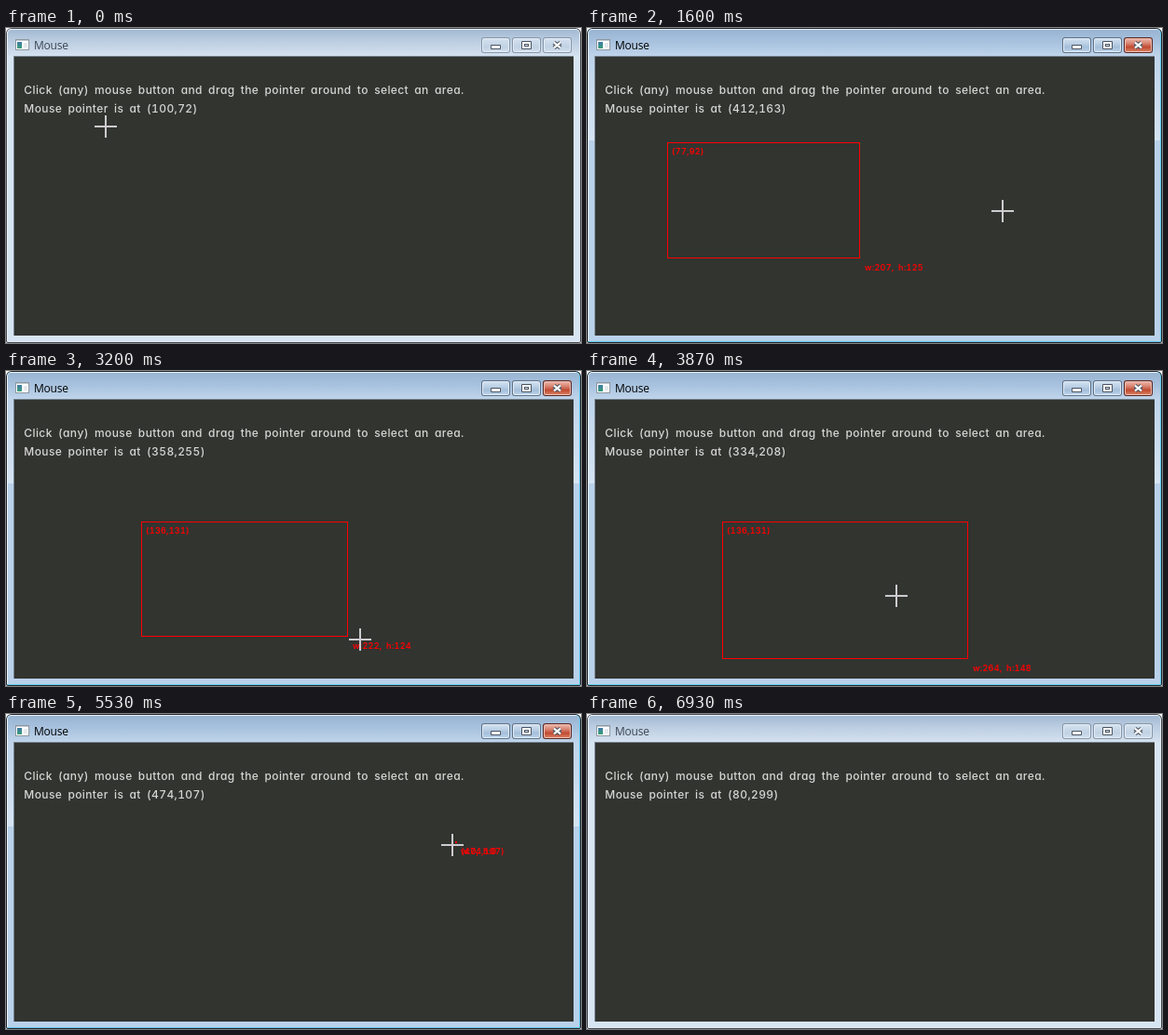
Recreate the animation shown at these times as an HTML page with a canvas. Size 617 by 339 pixels, loop 6.99 s.

```html
<!DOCTYPE html>
<html lang="en">
<head>
<meta charset="utf-8">
<title>Mouse</title>
<style>
  html, body { margin: 0; width: 100%; height: 100%; overflow: hidden; background: #fff; }
  canvas, svg { position: absolute; left: 0; top: 0; display: block; }
  text { white-space: pre; }
  .title { font: 12px "Open Sans", "Noto Sans", sans-serif; letter-spacing: -0.25px; }
  .info, .label {
    font-family: Inter, "Liberation Sans", sans-serif;
    font-feature-settings: "cv11" 1, "tnum" 1, "calt" 0;
    font-kerning: none;
  }
  .info { font-size: 12px; font-weight: 500; letter-spacing: 0.39px; word-spacing: 2.6px; fill: #d6d6d3; }
  .label { font-size: 9px; font-weight: 600; letter-spacing: 0.27px; word-spacing: 1.95px; fill: #f00; }
</style>
</head>
<body>
<canvas id="stage" width="617" height="339"></canvas>
<svg width="617" height="339">
  <text id="title" class="title" x="30" y="23">Mouse</text>
  <text class="info" x="19.3" y="71">Click (any) mouse button and drag the pointer around to select an area.</text>
  <text id="info" class="info" x="19.3" y="91"></text>
  <text id="from" class="label"></text>
  <text id="size" class="label"></text>
  <path id="cross" d="M-12 0H12M0 -12V12" stroke="#cdcbcf" stroke-width="2"/>
</svg>
<script>
const W = 617, H = 339, LOOP = 6990;
const CLIENT = { x: 9, y: 31 };
const CLEARED = 6400, POINTER_OUT = 6670, INACTIVE = 6930;
const REST = 200, SETTLE = 70; // pauses after a release and before a press

const point = (x, y) => ({ x, y });
const drag = (press, time, from, to) => ({ press, release: press + time, from, to });

const START = point(100, 72), END = point(80, 299);
const DRAGS = [
  drag(460, 730, point(77, 92), point(284, 217)),
  drag(1870, 410, point(531, 112), point(310, 249)),
  drag(2800, 535, point(136, 131), point(400, 279)),
  drag(4270, 695, point(269, 138), point(423, 247)),
  drag(5530, 670, point(474, 107), point(60, 283))
];

const el = id => document.getElementById(id);
const ctx = el('stage').getContext('2d');

function glide(a, b, t, t0, t1) {
  const u = Math.min(1, Math.max(0, (t - t0) / (t1 - t0))), s = u * u * (3 - 2 * u);
  return point(Math.round(a.x + (b.x - a.x) * s), Math.round(a.y + (b.y - a.y) * s));
}

// Each drag eases from press to release, then the pointer hovers to the next press
function pointerAt(t) {
  const i = DRAGS.findLastIndex(d => t >= d.press);
  const now = DRAGS[i], next = DRAGS[i + 1];
  if (now && t < now.release) return glide(now.from, now.to, t, now.press, now.release);
  return glide(now ? now.to : START, next ? next.from : END, t,
    now ? now.release + REST : SETTLE, next ? next.press - SETTLE : POINTER_OUT);
}

function gradient(y0, y1, ...colors) {
  const g = ctx.createLinearGradient(0, y0, 0, y1);
  colors.forEach((c, i) => g.addColorStop(i / (colors.length - 1), c));
  return g;
}

function box(x, y, w, h, r, fill) {
  ctx.beginPath();
  ctx.roundRect(x, y, w, h, r);
  ctx.fillStyle = fill;
  ctx.fill();
}

function rect(x, y, w, h, fill) {
  ctx.fillStyle = fill;
  ctx.fillRect(x, y, w, h);
}

function drawIcon() {
  rect(10, 12, 15, 12, '#8d979f');
  rect(11, 13, 13, 10, '#fff');
  rect(11, 13, 13, 1, '#c3ccd6');
  box(12, 15, 5, 7, 0, gradient(15, 22, '#3f78a8', '#3aa078'));
  rect(19, 16, 4, 5, '#e4e9ee');
}

function drawX(x, y, color, width) {
  ctx.beginPath();
  for (const s of [-1, 1]) {
    ctx.moveTo(x - 3.5, y - 2.8 * s);
    ctx.lineTo(x + 3.5, y + 2.8 * s);
  }
  ctx.strokeStyle = color;
  ctx.lineWidth = width;
  ctx.stroke();
}

function drawButtons(active) {
  const edge = active ? '#5d7186' : '#8796a8', ink = '#4b5562';
  const plain = active ? ['#cfdfef', '#bdd1e6', '#a5bfda', '#b9d0e8']
                       : ['#d3e0ee', '#c9d8e8', '#c1d2e4', '#d0deec'];
  const red = ['#e9b0a3', '#d98572', '#c14a32', '#d57c5e'];
  for (let i = 0; i < 3; i++) {
    const x = 510 + 33 * i, closing = active && i === 2;
    box(x, 10, 31, 17, 3, closing ? '#5a2520' : edge);
    box(x + 1, 11, 29, 15, 2, closing ? '#eebfb4' : '#e3edf7');
    box(x + 2, 12, 27, 13, 1, gradient(12, 25, ...(closing ? red : plain)));
  }
  box(520, 18, 11, 5, 1, ink);
  rect(521, 19, 9, 3, '#fff');
  box(553, 14, 11, 9, 1, ink);
  rect(554, 15, 9, 7, '#fff');
  rect(556, 17, 5, 3, ink);
  rect(557, 18, 3, 1, '#dce6f0');
  drawX(591.5, 18.5, ink, 4.4);
  drawX(591.5, 18.5, '#fff', 2.2);
}

function drawWindow(active) {
  rect(0, 0, W, H, '#fff');
  box(0, 0, W, H, [6, 6, 2, 2], active ? '#22282e' : '#464c53');
  box(1, 1, W - 2, H - 2, [5, 5, 1, 1], active ? '#63cdf0' : '#e6eef6');
  box(1, 1, W - 3, H - 3, [5, 5, 0, 0], '#eef5fc');
  box(2, 2, W - 4, H - 4, [4, 4, 0, 0], active ? '#b9d1ea' : '#d7e4f2');
  if (active) {
    rect(W - 2, 30, 1, H - 32, '#63cdf0');
    rect(2, H - 2, W - 4, 1, '#63cdf0');
    rect(2, 30, W - 4, 91, gradient(30, 121, '#bfd4ea', '#d6e4f3'));
  }
  box(2, 2, W - 4, 28, [4, 4, 0, 0],
    active ? gradient(2, 30, '#98b4d2', '#a9c3df', '#bfd4ea')
           : gradient(2, 30, '#a3bad3', '#bfd0e3', '#d4e1ef'));
  rect(8, 30, 601, 301, '#73808c');
  rect(CLIENT.x, CLIENT.y, 600, 300, '#323430');
  drawIcon();
  drawButtons(active);
}

function place(node, x, y, text) {
  node.setAttribute('x', x);
  node.setAttribute('y', y);
  node.textContent = text;
}

function drawSelection(t) {
  const now = t < CLEARED && DRAGS.findLast(d => t >= d.press);
  el('from').style.visibility = el('size').style.visibility = now ? 'visible' : 'hidden';
  if (!now) return;
  const a = now.from, b = pointerAt(Math.min(t, now.release));
  const w = b.x - a.x, h = b.y - a.y;
  const x = a.x + CLIENT.x, y = a.y + CLIENT.y;
  ctx.strokeStyle = '#f00';
  ctx.lineWidth = 1;
  ctx.strokeRect(x + 0.5, y + 0.5, w - 1, h - 1);
  place(el('from'), x + 5, y + 13, `(${a.x},${a.y})`);
  place(el('size'), x + w + 5, y + h + 13, `w:${w}, h:${h}`.replace('-', '\u2212'));
}

function draw(t) {
  const active = t >= DRAGS[0].press && t < INACTIVE;
  const p = pointerAt(t);
  const lead = pointerAt(t + 30); // the cursor runs slightly ahead of the readout
  drawWindow(active);
  drawSelection(t);
  el('title').setAttribute('fill', active ? '#000' : '#3b4652');
  el('info').textContent = `Mouse pointer is at (${p.x},${p.y})`;
  el('cross').setAttribute('transform', `translate(${lead.x + 7} ${p.y + 34})`);
  el('cross').style.visibility = t < POINTER_OUT ? 'visible' : 'hidden';
}

// The picture steps 15 times per second, rounded to 10 ms
let last = -1;
function tick() {
  const step = Math.floor((performance.now() % LOOP + 4) * 15 / 1000);
  if (step !== last) draw(Math.round(step * 20 / 3) * 10);
  last = step;
  requestAnimationFrame(tick);
}
tick();
</script>
</body>
</html>
```
